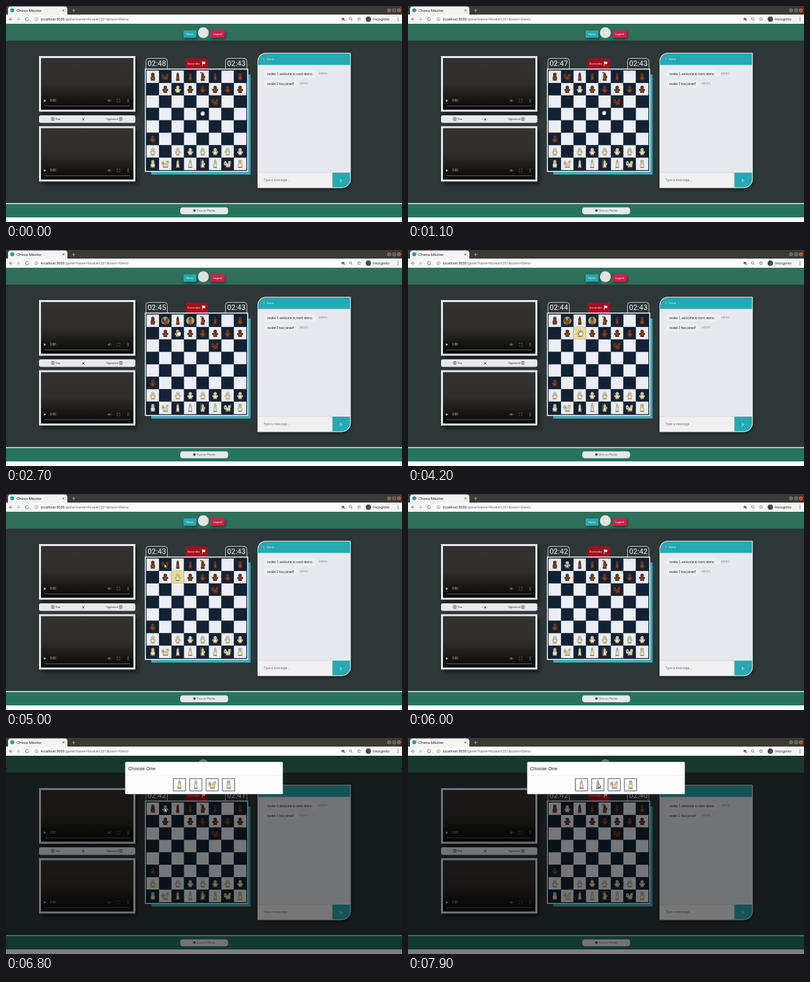
These frames come from a looping animation (600x328 px, 8 s). An HTML page with a canvas:

```html
<!DOCTYPE html>
<html lang="en">
<head>
<meta charset="utf-8">
<title>Chess Master</title>
<style>
html, body { margin: 0; width: 100%; height: 100%; overflow: hidden; background: #fff; }
canvas { display: block; width: 100vw; height: 100vh; }
</style>
</head>
<body>
<canvas id="stage"></canvas>
<script>
const W = 600, H = 328, LOOP = 8000, STEP = 100;
const SANS = 'Roboto, sans-serif';
const TEAL = '#26a9b4', PALE = '#e6e8ee', GREEN = '#30705a', NAVY = '#122234';
const BOARD = { x: 213, y: 98, cell: 18.9 };
const canvas = document.getElementById('stage');
const ctx = canvas.getContext('2d');
const ratio = window.devicePixelRatio || 1;
canvas.width = W * ratio;
canvas.height = H * ratio;

function box(x, y, w, h, fill, radius = 0, stroke, width = 1) {
  ctx.beginPath();
  ctx.roundRect(x, y, w, h, radius);
  if (fill) { ctx.fillStyle = fill; ctx.fill(); }
  if (stroke) { ctx.strokeStyle = stroke; ctx.lineWidth = width; ctx.stroke(); }
}

function disc(x, y, rx, fill, ry = rx) {
  ctx.beginPath();
  ctx.ellipse(x, y, rx, ry, 0, 0, Math.PI * 2);
  ctx.fillStyle = fill;
  ctx.fill();
}

function arc(x, y, r, from, to, stroke, width = 0.7) {
  ctx.beginPath();
  ctx.arc(x, y, r, from, to);
  ctx.strokeStyle = stroke;
  ctx.lineWidth = width;
  ctx.stroke();
}

function path(points, { fill, stroke, width = 0.8, close = false } = {}) {
  ctx.beginPath();
  points.forEach(([x, y]) => ctx.lineTo(x, y));
  if (close) ctx.closePath();
  if (fill) { ctx.fillStyle = fill; ctx.fill(); }
  if (stroke) { ctx.strokeStyle = stroke; ctx.lineWidth = width; ctx.stroke(); }
}

function text(str, x, y, size, fill, align = 'left', family = SANS) {
  ctx.font = `${size}px ${family}`;
  ctx.textAlign = align;
  ctx.textBaseline = 'middle';
  ctx.fillStyle = fill;
  ctx.fillText(str, x, y);
}

function shadowed(draw, blur = 4, dx = 1, dy = 2) {
  ctx.save();
  ctx.shadowColor = 'rgba(0,0,0,.5)';
  ctx.shadowBlur = blur * ratio;
  ctx.shadowOffsetX = dx * ratio;
  ctx.shadowOffsetY = dy * ratio;
  draw();
  ctx.restore();
}

function cross(x, y, r, stroke, width = 0.8) {
  path([[x - r, y - r], [x + r, y + r]], { stroke, width });
  path([[x + r, y - r], [x - r, y + r]], { stroke, width });
}

function browser() {
  box(0, 0, W, 14, '#3b3a35');
  box(3, 0.8, 90, 14, '#f3f3f2', [4, 4, 0, 0]);
  disc(9.5, 6.6, 3, '#2398a3');
  text('Chess Master', 16, 6.8, 6.2, '#333');
  cross(87, 6.8, 1.6, '#555');
  path([[100, 6.8], [105, 6.8]], { stroke: '#aaa' });
  path([[102.5, 4.3], [102.5, 9.3]], { stroke: '#aaa' });
  for (const x of [580.5, 588]) disc(x, 6.4, 2.9, '#77756f');
  path([[579, 6.4], [582, 6.4]], { stroke: '#3b3a35', width: 0.7 });
  box(586.8, 5.2, 2.4, 2.4, null, 0, '#3b3a35', 0.6);
  disc(595.3, 6.4, 2.9, '#d9583a');
  cross(595.3, 6.4, 1.1, '#4a2a20', 0.6);

  box(0, 13, W, 14, '#f5f5f4');
  box(39, 14.6, 503, 10.6, '#fdfdfd', 5);
  const ink = '#666';
  path([[8, 17.5], [5.2, 20], [8, 22.5]], { stroke: ink });
  path([[5.2, 20], [10, 20]], { stroke: ink });
  path([[18, 17.5], [20.8, 20], [18, 22.5]], { stroke: '#aaa' });
  path([[16, 20], [20.8, 20]], { stroke: '#aaa' });
  arc(32, 20, 2.4, 0.2, 5.4, ink, 0.9);
  arc(46, 20, 2.4, 0, 7, ink, 0.6);
  box(45.7, 19.6, 0.7, 2, ink);
  const host = 'localhost:3000';
  text(host, 53, 20, 5.4, '#222');
  text('/game?name=Rookie%201&room=Demo', 53 + ctx.measureText(host).width, 20, 5.4, '#666');
  box(508.5, 18, 4, 3.6, ink, 0.5);
  cross(512.6, 21.8, 1, '#d33');
  arc(522, 19.4, 1.8, 0, 7, ink, 0.8);
  path([[523.3, 20.8], [525, 22.6]], { stroke: ink });
  const star = Array.from({ length: 10 }, (_, i) => {
    const r = i % 2 ? 1.2 : 2.9, a = i * Math.PI / 5 - Math.PI / 2;
    return [535 + r * Math.cos(a), 20 + r * Math.sin(a)];
  });
  path(star, { stroke: ink, width: 0.6, close: true });
  disc(549, 20, 4, '#45484c');
  text('Incognito', 556, 20, 6, '#333');
  for (const y of [17.8, 20, 22.2]) disc(594, y, 0.7, ink);
}

function video(x, y, h) {
  shadowed(() => box(x, y, 146, h, PALE), 6, 3, 4);
  const shade = ctx.createLinearGradient(0, y + 3, 0, y + h - 3);
  shade.addColorStop(0, '#343230');
  shade.addColorStop(0.5, '#302e2c');
  shade.addColorStop(0.85, '#131211');
  shade.addColorStop(1, '#080808');
  box(x + 3, y + 3, 140, h - 6, shade);
  const row = y + h - 16.8, ink = '#c4c4c4', faint = '#666';
  path([[x + 7.5, row - 2], [x + 10.8, row], [x + 7.5, row + 2]], { fill: ink, close: true });
  text('0:00', x + 17, row + 0.2, 4.6, ink);
  path([[x + 104, row - 1], [x + 105.5, row - 1], [x + 107.5, row - 2.5],
    [x + 107.5, row + 2.5], [x + 105.5, row + 1], [x + 104, row + 1]], { fill: faint, close: true });
  path([[x + 109, row - 1.5], [x + 109, row + 1.5]], { stroke: faint });
  for (const sx of [-1, 1]) for (const sy of [-1, 1]) {
    const cx = x + 120.5, r = 2.2;
    path([[cx + sx * 0.8, row + sy * r], [cx + sx * r, row + sy * r], [cx + sx * r, row + sy * 0.8]],
      { stroke: faint });
  }
  for (const dy of [-2, 0, 2]) disc(x + 135, row + dy, 0.6, ink);
  box(x + 8, row + 7.6, 130, 1, '#62615f', 0.5);
}

function playersBar() {
  box(50, 166, 146, 11.6, PALE, 3);
  const ink = '#2b3038';
  for (const x of [69, 172]) {
    box(x, 169.3, 4, 4.4, null, 0.4, ink, 0.6);
    disc(x + 2, 170.9, 0.7, ink);
    box(x + 1, 172.3, 2, 0.5, ink);
  }
  text('You', 75, 172.2, 4.2, ink);
  text('Opponent', 152, 172.2, 4.2, ink);
  cross(117, 172, 1.7, ink);
}

function clock(x, seconds) {
  ctx.beginPath();
  ctx.moveTo(x, 95);
  ctx.arcTo(x, 79.5, x + 16, 79.5, 4);
  ctx.arcTo(x + 32.5, 79.5, x + 32.5, 95, 4);
  ctx.lineTo(x + 32.5, 95);
  ctx.strokeStyle = '#cfd5d8';
  ctx.lineWidth = 0.9;
  ctx.stroke();
  text(`02:${seconds}`, x + 16.5, 87.7, 11.2, '#f2f4f5', 'center');
}

// Pieces are drawn around their own centre, about 14 units tall before scaling.
function piece(kind, light, x, y, size = 0.84) {
  const body = light ? '#dbd0a8' : '#733b21';
  const dark = light ? '#83765a' : '#4a2312';
  const glow = light ? '#f2ebcf' : '#8f4c2a';
  ctx.save();
  ctx.translate(x, y);
  ctx.scale(size, size);
  const shape = points => path(points, { fill: body, stroke: dark, width: 0.6, close: true });
  const ball = (px, py, rx, ry) => { disc(px, py, rx + 0.3, dark, ry + 0.3); disc(px, py, rx, body, ry); };
  if (kind === 'n') {
    ball(-4.2, -1.2, 2.4, 3.8);
    disc(-4.1, -1.5, 1, dark, 1.8);
    ball(0.8, 2.2, 4, 3.4);
    ball(3.4, -2.6, 2.3, 2.6);
    shape([[4, -4.5], [5, -6.4], [5.6, -3.8]]);
    disc(4.1, -2.8, 0.6, dark);
    box(-4.5, 5, 9.5, 1.6, dark, 0.7);
  } else if (kind === 'p') {
    ball(0, 2.2, 3.4, 3.8);
    ball(0, -3.4, 2.8, 3);
    ball(-3.9, 1, 1.2, 1.4);
    ball(3.9, 1, 1.2, 1.4);
    disc(-1, -3.2, 0.6, dark);
    disc(1, -3.2, 0.6, dark);
    disc(0, 2, 1.7, glow);
    box(-3.7, 5.2, 7.4, 1.3, dark, 0.6);
  } else if (kind === 'r') {
    ball(0, 2.2, 3.7, 4);
    ball(0, -3.4, 2.7, 3);
    shape([[-2.6, -5], [-2, -7], [2, -7], [2.6, -5]]);
    disc(-1, -3, 0.6, dark);
    disc(1, -3, 0.6, dark);
    disc(0, 2.4, 1.8, glow, 2);
    box(-4, 5.4, 8, 1.4, dark, 0.6);
  } else {
    const w = kind === 'b' ? 2.7 : 3.2;
    shape([[-1.8, -3], [1.8, -3], [w, 6], [-w, 6]]);
    ball(0, -3.5, kind === 'b' ? 2 : 2.3, 2.3);
    shape([[-1.5, -5], [0, -8.4], [1.5, -5]]);
    disc(0, 1.8, 1.2, glow, 2.3);
    disc(-0.7, -3.4, 0.45, dark);
    disc(0.7, -3.4, 0.45, dark);
    box(-w - 0.4, 5.6, 2 * w + 0.8, 1.5, dark, 0.6);
    if (kind === 'k') {
      path([[-4, -9], [-4, 6]], { stroke: light ? dark : '#d8c9b6', width: 0.9 });
      path([[-4, -9], [-0.5, -7.5], [-4, -5.8]], { fill: light ? '#4a463a' : '#a5332b', close: true });
      ball(3.3, 0, 0.9, 2);
    }
  }
  ctx.restore();
}

const START = ['rnbqkb r', ' pPppppp', '     n  ', '', '', 'p', 'P PPPPPP', 'RNBQKBNR'];
const PROMOTED = ['rPbqkb r', ' p ppppp', ...START.slice(2)];

function board(t) {
  const { x, y, cell } = BOARD;
  box(220, 104, 150.5, 152, '#43a8b8');
  box(210.5, 95, 156.5, 157, '#f1f3f6');
  box(212, 96.6, 153.5, 153.8, NAVY);
  const rows = t < 5900 ? START : PROMOTED;
  const chosen = t >= 3400 && t < 5900;
  const hovered = t >= 2200 && t < 4800;
  for (let r = 0; r < 8; r++) for (let c = 0; c < 8; c++) {
    const px = x + c * cell, py = y + r * cell;
    box(px, py, cell, cell, (r + c) % 2 ? NAVY : '#eceef4');
    if (chosen && r === 1 && c === 2) box(px, py, cell, cell, '#eadb97');
    const mark = rows[r][c] || ' ';
    const target = hovered && r === 0 && (c === 1 || c === 3);
    if (target) disc(px + cell / 2, py + cell / 2, 6.2, '#b9a06a');
    if (mark === ' ') continue;
    ctx.globalAlpha = target ? 0.5 : 1;
    const kind = mark.toLowerCase();
    piece(kind, mark !== kind, px + cell / 2, py + cell / 2 + 0.2);
    ctx.globalAlpha = 1;
  }
}

function chat() {
  const corners = [12, 0, 13, 0];
  shadowed(() => box(381.5, 71.5, 140.5, 204.5, PALE, corners), 5, 1, 2);
  box(382, 72, 139.5, 17.4, TEAL, [12, 0, 0, 0]);
  path([[391.5, 79], [390, 80.5], [391.5, 82]], { stroke: '#d8f2f4', width: 0.6 });
  text('Demo', 395, 80.8, 4.2, '#e9fafa');
  const lines = [['rookie 1, welcome to room demo.', 97.2, 81, 474], ['rookie 2 has joined!', 112.2, 52, 445]];
  for (const [line, y, w, from] of lines) {
    box(390, y, w, 11.5, '#edeef1', 5);
    text(line, 396, y + 6.3, 4.65, '#252a30');
    text('admin', from, y + 5.6, 4.7, '#92969c');
  }
  box(382, 253, 113, 22.5, '#f1f0f0');
  box(382, 252.6, 113, 0.6, '#d3d5da');
  text('Type a message...', 390, 265, 5, '#777');
  box(494.5, 253, 27, 22.5, TEAL, [0, 0, 13, 0]);
  path([[506, 262.8], [509.4, 265], [506, 267.2], [506.8, 265]], { stroke: '#d5f2f3', width: 0.6, close: true });
  box(381.5, 71.5, 140.5, 204.5, null, corners, '#e4e9ec', 0.9);
}

function page(t) {
  box(0, 27, W, 301, '#fdfdfd');
  box(0, 27, W, 273, '#2d3737');
  box(0, 27, W, 25.5, GREEN);
  box(0, 299.2, W, 1.6, '#dfe5e3');
  box(0, 300.8, W, 20.2, '#27735c');
  shadowed(() => box(269, 37, 19.5, 11.3, TEAL, 1.2));
  text('Home', 278.7, 43, 4.3, '#eefafa', 'center');
  disc(299, 40.5, 8.2, '#dfe3e1');
  shadowed(() => box(309.8, 37, 21.5, 11.3, '#cf2147', 1.2));
  text('Logout', 320.5, 43, 4.4, '#fff', 'center');

  video(50, 76, 84.5);
  playersBar();
  video(50, 182.5, 84);

  const left = 48 - Math.min(6, Math.floor((t + 300) / 1000));
  const right = t < 5900 ? 43 : t < 6800 ? 42 : t < 7800 ? 41 : 40;
  clock(212, left);
  clock(332.5, right);
  box(272, 79.8, 34, 15.5, '#a50f1e', 1);
  text('Surrender', 275, 87.6, 4.4, '#fbeaea');
  path([[297.3, 84.3], [297.3, 91]], { stroke: '#fff', width: 0.7 });
  path([[297.5, 84.3], [302.2, 84.9], [301.5, 88.2], [297.5, 87.9]], { fill: '#fff', close: true });
  board(t);
  chat();
  box(264, 305.7, 72.5, 10.5, PALE, 4);
  disc(285.5, 310.6, 1.9, '#30343a');
  text('View on Plimbo', 289, 311, 4.1, '#4d5258');
}

function modal(t) {
  if (t < 6100) return;
  const k = Math.min(1, (t - 6000) / 300);
  const ease = 1 - (1 - k) ** 2;
  ctx.fillStyle = `rgba(0,0,0,${0.5 * Math.min(1, (t - 5980) / 180)})`;
  ctx.fillRect(0, 27, W, 301);
  ctx.save();
  ctx.beginPath();
  ctx.rect(0, 27.5, W, 301);
  ctx.clip();
  ctx.globalAlpha = Math.min(1, (t - 5980) / 180);
  ctx.translate(0, -16.5 * (1 - ease));
  box(180.5, 36.3, 239, 49, '#fefefe', 1.5, 'rgba(0,0,0,.2)', 0.6);
  text('Choose One', 185, 46.8, 7.4, '#1d2023', 'left', '"Liberation Sans", Arial, sans-serif');
  box(181, 56, 238, 0.6, '#e1e3e6');
  ['q', 'b', 'n', 'r'].forEach((kind, i) => {
    const x = 253.5 + i * 24.8;
    box(x, 61.7, 18.6, 18.6, '#fff', 0, '#252c50', 0.8);
    piece(kind, true, x + 9.3, 71, 0.88);
  });
  ctx.restore();
}

const TRAIL = [[0, 298, 163], [1000, 298, 163], [1750, 280, 145], [1900, 280, 145],
  [2200, 262, 127], [4600, 262, 127], [5000, 241, 109], [7200, 241, 109], [7850, 289, 72], [8000, 289, 72]];

function pointerAt(t) {
  const i = TRAIL.findIndex(stop => stop[0] > t);
  const [t0, x0, y0] = TRAIL[i - 1], [t1, x1, y1] = TRAIL[i];
  const k = (t - t0) / (t1 - t0), ease = k * k * (3 - 2 * k);
  return [x0 + (x1 - x0) * ease, y0 + (y1 - y0) * ease];
}

function pointer(t) {
  const [x, y] = pointerAt(t);
  ctx.save();
  ctx.translate(x, y);
  if (t < 5000) {
    const fingers = [-2, -0.6, 0.8, 2.2];
    fingers.forEach((fx, i) => box(fx - 0.8, i === 0 || i === 3 ? -2.6 : -3.5, 1.6, 5, '#fff', 0.8, '#222', 0.5));
    path([[-2.8, 0], [-3.8, -0.4], [-2, 3.6], [2.2, 3.6], [3, 0]], { fill: '#fff', stroke: '#222', width: 0.5, close: true });
    box(-2.3, -1.5, 4.7, 4.2, '#fff', 1);
  } else {
    path([[-1, -3], [-1, 3.6], [0.6, 2.2], [1.7, 4.5], [2.8, 4], [1.8, 1.8], [3.7, 1.7]],
      { fill: '#fff', stroke: '#111', width: 0.7, close: true });
  }
  ctx.restore();
}

function draw(now) {
  const t = Math.floor((now % LOOP) / STEP) * STEP;
  ctx.setTransform(ratio, 0, 0, ratio, 0, 0);
  page(t);
  browser();
  modal(t);
  pointer(t);
}

const began = performance.now();
function tick() {
  draw(performance.now() - began);
  requestAnimationFrame(tick);
}
tick();
</script>
</body>
</html>
```
